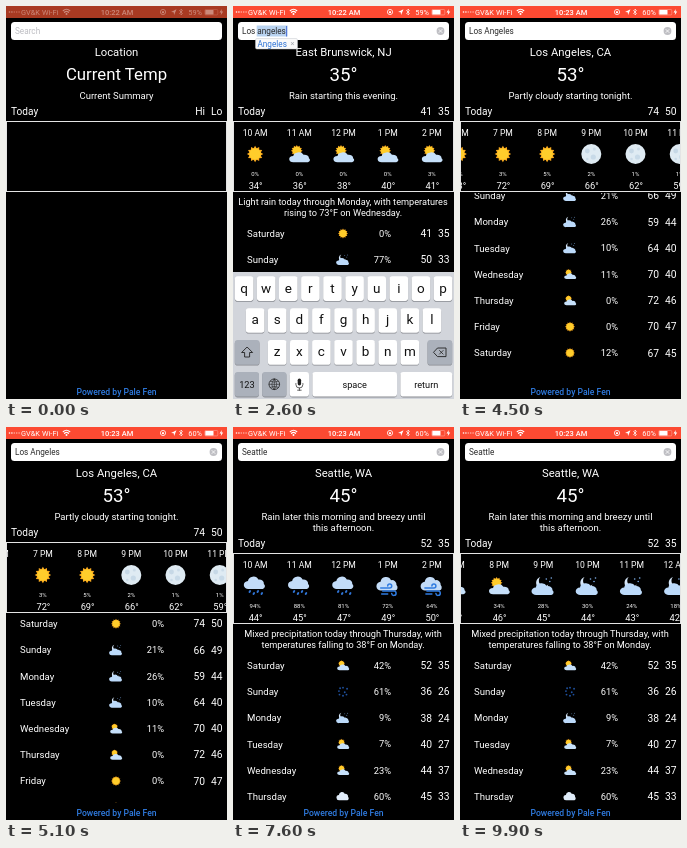
Animation, 221 px wide and 393 px high, one loop 10 s. Source, as an HTML page:

```html
<!DOCTYPE html>
<html lang="en">
<head>
<meta charset="utf-8">
<title>Weather</title>
<style>
  html, body { margin: 0; width: 100%; height: 100%; overflow: hidden; background: #000; }
  #stage { display: block; width: 100vw; height: 100vh; font-family: Roboto, "Liberation Sans", sans-serif; }
</style>
</head>
<body>
<svg id="stage" viewBox="0 0 221 393"></svg>
<script>
const LOOP = 10000, STEP = 100;
const CELL = 44.2, ROW = 26.2;

// ---- drawing helpers ----
const text = (x, y, str, size, anchor = 'middle', fill = '#fff', extra = '') =>
  `<text x="${x}" y="${y + size * 0.355}" font-size="${size}" text-anchor="${anchor}" fill="${fill}" ${extra}>${str}</text>`;
const rect = (x, y, w, h, fill, r = 0, extra = '') =>
  `<rect x="${x}" y="${y}" width="${w}" height="${h}" rx="${r}" fill="${fill}" ${extra}/>`;
const circle = (x, y, r, fill, extra = '') => `<circle cx="${x}" cy="${y}" r="${r}" fill="${fill}" ${extra}/>`;
const path = (d, fill, extra = '') => `<path d="${d}" fill="${fill}" ${extra}/>`;
const line = (d, color, w = 1) => path(d, 'none', `stroke="${color}" stroke-width="${w}" stroke-linecap="round"`);
const at = (x, y, s, body) => `<g transform="translate(${x} ${y}) scale(${s})">${body}</g>`;

// ---- weather icons, about 20 units wide ----
const star = Array.from({ length: 24 }, (_, i) => {
  const r = i % 2 ? 6.2 : 8.6, a = i * Math.PI / 12;
  return `${(r * Math.cos(a)).toFixed(2)},${(r * Math.sin(a)).toFixed(2)}`;
}).join(' ');
const sun = `<polygon points="${star}" fill="#fbab1e"/>` + circle(0, 0, 6, '#ffcd2b');
const cloud = fill => path('M-6 6a4 4 0 0 1-.5-8 5 5 0 0 1 9.5-1.5 4.2 4.2 0 0 1 5 4.5 3 3 0 0 1-1 5z', fill);
const crescent = path('M-2-8a6.2 6.2 0 1 0 8 7.500a5.400 5.400 0 0 1-8-7.500z', '#d5e6f8');
const sparks = [[3, -7], [6.500, -4.500], [8, -8]].map(([x, y]) => circle(x, y, 0.8, '#7fb0ea')).join('');
const drops = (color, y) => [-5, -1, 3, 7].map((x, i) =>
  line(`M${x} ${y + i % 2 * 2}l-.6 1`, color, 1.9)).join('');
const ICONS = {
  sun,
  partly: at(-2.5, -3.2, 0.68, sun) + at(1, 3.5, '1.08 .8', cloud('#c6e0fa')),
  moon: circle(0, 0, 10, '#dfebf3') + circle(-4, -3, 2.4, '#c6d8e6') + circle(3, -5, 1.5, '#cbdce9') +
    circle(2, 3, 2.6, '#c8dae8') + circle(-4, 5, 1.3, '#cbdce9'),
  night: at(-1, -1, 1, crescent) + sparks + at(0, 3.3, '1.15 .95', cloud('#bcdafa')),
  rain: at(0, -3, '1.1 1', cloud('#c3dcf8')) + drops('#2f74d6', 5),
  sleet: [[-5, -6], [0, -7], [-7, -1], [3, 1], [-6, 5], [0, 7], [6, 5], [7, -5]]
    .map(([x, y]) => circle(x, y, 1.6, '#1f519f')).join(''),
  wind: at(0, -2, 1.1, cloud('#c3dcf8')) +
    line('M-7 2H2a2 2 0 1 0-2-2M-5 5H6a2.200 2.200 0 1 1-2 2.500M-6 8H0', '#2f7be0', 1.5),
  cloud: at(0, -0.5, '1.1 1.15', cloud('#e0ecf9')),
  shower: at(0, -2, 1.1, cloud('#eef2f6')) + drops('#8a98a8', 5),
};
const icon = (name, x, y, s) => at(x, y, s, ICONS[name]);

// ---- data: hours are "icon chance temp", days are "icon chance high low" ----
const split = str => str.split(', ').map(s => s.split(' '));
const scenes = [
  { until: 500, temp: 'Current Temp', summary: ['Current Summary'], hi: 'Hi', lo: 'Lo', hours: [], days: [], outlook: [] },
  {
    until: 3000, temp: '35°', summary: ['Rain starting this evening.'], hi: 41, lo: 35,
    outlook: ['Light rain today through Monday, with temperatures', 'rising to 73°F on Wednesday.'],
    hours: split('sun 0 34, partly 0 36, partly 0 38, partly 0 40, partly 3 41'),
    days: split('sun 0 41 35, night 77 50 33, shower 61 50 48, partly 24 62 50, partly 12 73 54, shower 38 66 47'),
  },
  {
    until: 7600, temp: '53°', summary: ['Partly cloudy starting tonight.'], hi: 74, lo: 50,
    outlook: ['No precipitation throughout the week, with', 'temperatures falling to 59°F on Monday.'],
    hours: split('sun 0 53, sun 0 57, sun 0 61, sun 0 65, sun 0 68, sun 0 71, sun 0 73, sun 0 74, sun 1 73, ' +
      'sun 3 72, sun 5 69, moon 2 66, moon 1 62, moon 1 59'),
    days: split('sun 0 74 50, night 21 66 49, night 26 59 44, night 10 64 40, partly 11 70 40, partly 0 72 46, ' +
      'sun 0 70 47, sun 12 67 45'),
    slide: [[3400, 0], [3500, 40], [3700, 215], [3900, 325], [4200, 377], [4500, 377], [4900, 383]],
    scroll: [[4100, 0], [4300, 40], [4500, 64], [4700, 52], [4900, 46], [5000, 46], [5300, 0]],
  },
  {
    until: LOOP, temp: '45°', summary: ['Rain later this morning and breezy until', 'this afternoon.'], hi: 52, lo: 35,
    outlook: ['Mixed precipitation today through Thursday, with', 'temperatures falling to 38°F on Monday.'],
    hours: split('rain 94 44, rain 88 45, rain 81 47, wind 72 49, wind 64 50, wind 55 51, partly 50 51, partly 45 50, ' +
      'partly 40 49, partly 38 47, partly 34 46, night 28 45, night 30 44, night 24 43, night 18 42'),
    days: split('partly 42 52 35, sleet 61 36 26, night 9 38 24, partly 7 40 27, partly 23 44 37, cloud 60 45 33, ' +
      'partly 31 47 36, rain 52 48 38'),
    slide: [[9400, 0], [9500, 60], [9700, 285], [9900, 425]],
    scroll: [[8300, 0], [8500, 30], [8700, 66], [8900, 59], [9100, 55], [9400, 0]],
  },
];
const DAYS = ['Saturday', 'Sunday', 'Monday', 'Tuesday', 'Wednesday', 'Thursday', 'Friday'];

const hourCell = ([name, chance, temp], i) => {
  const h = 10 + i, x = CELL * (i + 0.5);
  return text(x, 11.5, `${(h + 11) % 12 + 1} ${h % 24 < 12 ? 'AM' : 'PM'}`, 8.6) +
    icon(name, x, 33, name === 'sun' ? 0.95 : 1) +
    text(x, 53, chance + '%', 6) + text(x + 0.5, 65, temp + '°', 9.3);
};
const dayRow = ([name, chance, hi, lo], i) => {
  const y = 40.5 + ROW * i;
  return text(14, y, DAYS[i % 7], 9.6, 'start') + icon(name, 110, y, 0.58) +
    text(158, y, chance + '%', 9.3, 'end') + text(199, y, hi, 10.3, 'end') + text(216.5, y, lo, 10.3, 'end');
};
function sceneMarkup(s) {
  const dy = 11 * (s.summary.length - 1);
  return `<g class="scene">` +
    text(110.5, 68, s.temp, s.hours.length ? 18.7 : 16.8) +
    s.summary.map((str, i) => text(110.5, 90 + 11 * i, str, 9.5)).join('') +
    text(5, 105 + dy, 'Today', 10.1, 'start') +
    text(199, 105 + dy, s.hi, 10.3, 'end') + text(216.5, 105 + dy, s.lo, 10.3, 'end') +
    `<svg y="${115 + dy}" width="221" height="71"><g class="hours">${s.hours.map(hourCell).join('')}</g></svg>` +
    rect(0.5, 115.5 + dy, 220, 70, 'none', 0, 'stroke="#e4e4e4"') +
    `<svg y="${187 + dy}" width="221" height="${189 - dy}"><g class="days">` +
    s.outlook.map((str, i) => text(110, 8.5 + 11.4 * i, str, 9.2)).join('') +
    s.days.map(dayRow).join('') + `</g></svg></g>`;
}

// ---- fixed parts ----
const statusBar = rect(0, 0, 221, 12, '#fc4a32', 0, 'id="bar"') + `<g id="status">` +
  [0, 1, 2, 3, 4].map(i => circle(3.5 + i * 2.4, 6, 0.8, i < 2 ? '#fff' : '#ffb3a6')).join('') +
  text(15, 6, 'GV&amp;K', 7.4, 'start') + text(36, 6, 'Wi-Fi', 7.4, 'start') +
  line('M57.200 4.700a4.700 4.700 0 0 1 6.600 0M58.500 6.300a2.900 2.900 0 0 1 4 0', '#fff', 1.2) + circle(60.5, 8, 1, '#fff') +
  text(111, 6, '', 7.5, 'middle', '#fff', 'id="clock" font-weight="500"') +
  circle(157, 6, 2.6, 'none', 'stroke="#fff" stroke-width=".8"') + rect(156, 5.3, 2, 1.8, '#fff') +
  path('M170.500 3.300l-5.500 2.600 2.700.400.400 2.700z', '#fff') +
  line('M173.500 4.500l3 3-1.500 1.500v-6l1.500 1.500-3 3', '#fff', 0.7) +
  text(196, 6, '', 7.4, 'end', '#fff', 'id="charge"') +
  rect(198.8, 3.5, 13, 5.4, 'none', 1, 'stroke="#ffb3a6" stroke-width=".5"') + rect(199.3, 4, 8.2, 4.4, '#fff', 0.5) +
  path('M215.800 3l-2.300 3.500h1.700l-.500 2.700 2.500-3.600h-1.700z', '#fff') + `</g>`;

const searchBar = rect(5, 16, 211, 18, '#fff', 3.5) +
  rect(23.7, 19.5, 31, 11, '#b9d3f0', 0, 'id="mark"') +
  text(9, 25.2, 'Search', 8.2, 'start', '#bdbdc2', 'id="hint"') +
  text(9, 25.2, '', 8.2, 'start', '#2a2a2a', 'id="query"') +
  rect(0, 20, 0.9, 10.5, '#4a6fd8', 0, 'id="caret"') +
  `<g id="clear">${circle(207.5, 25, 3.9, '#bfbfc4')}${line('M206 23.500l3 3m0-3l-3 3', '#fff', 0.8)}</g>`;

const hintBox = `<g id="fix">` + rect(22.5, 32.5, 42, 10.5, '#fafafa', 1.5, 'stroke="#c4c8cf" stroke-width=".5"') +
  text(24.5, 37.7, 'Angeles', 8.2, 'start', '#2f74d6') + text(59.5, 37.7, '×', 7.5, 'middle', '#a5a9b0') + `</g>`;

const GREY = '#abb1bb';
const key = (x, w, row, label, size = 13.5, fill = '#fff', extra = '') => {
  const y = 270.3 + 31.9 * row;
  return rect(x, y + 0.8, w, 24.6, '#878a90', 2.8) + rect(x, y, w, 24.6, fill, 2.8, extra) +
    (label ? text(x + w / 2, y + 12.3 - (size > 12 ? 0.8 : 0), label, size, 'middle', '#111', extra && 'id="returnText"') : '');
};
const letters = (str, x, row) => [...str].map((c, i) => key(x + 22.1 * i, 18.6, row, c)).join('');
const outline = d => path(d, 'none', 'stroke="#222" stroke-width=".9" stroke-linejoin="round"');
const keyboard = `<g id="keyboard">` + rect(0, 266, 221, 127, '#d2d5db') +
  letters('qwertyuiop', 1.8, 0) + letters('asdfghjkl', 12.8, 1) + letters('zxcvbnm', 34.9, 2) +
  key(1.8, 24.7, 2, '', 0, GREY) + outline('M14.100 341l5.500 5.500h-3v4.500h-5v-4.500h-3z') +
  key(194.5, 24.7, 2, '', 0, GREY) + outline('M200.500 346.300l4-4.300h8.500v8.600h-8.500z') +
  line('M206.500 344.500l3.600 3.600m0-3.600l-3.600 3.600', '#222', 0.8) +
  key(1.8, 24.2, 3, '123', 9.2, GREY) + key(29.2, 24.2, 3, '', 0, GREY) +
  circle(41.3, 378.3, 5.3, 'none', 'stroke="#222" stroke-width=".8"') +
  line('M36 378.300h10.600M41.300 373v10.600M37.300 375.300q4 1.800 8 0M37.300 381.300q4-1.800 8 0M41.300 373q-5 5.300 0 10.600q5-5.300 0-10.600', '#222', 0.6) +
  key(56.7, 19.3, 3, '') + rect(64.7, 372.5, 3.4, 7, '#222', 1.7) +
  line('M62.900 377.500v1a3.500 3.500 0 0 0 7 0v-1M66.400 382v2.200m-1.800 0h3.600', '#222', 0.7) +
  key(79.4, 84.6, 3, 'space', 9.2) + key(167.4, 51.8, 3, 'return', 9.2, GREY, 'id="returnKey"') + `</g>`;

const $ = id => document.getElementById(id);
const stage = $('stage');
stage.innerHTML = rect(0, 0, 221, 393, '#000') + scenes.map(sceneMarkup).join('') +
  text(110.5, 45.5, '', 11.3, 'middle', '#fff', 'id="city"') +
  text(110.5, 385.6, 'Powered by Pale Fen', 8.6, 'middle', '#2f7be0', 'font-weight="500"') +
  statusBar + searchBar + hintBox + keyboard;
const views = [...stage.querySelectorAll('.scene')].map(el => ({
  el, hours: el.querySelector('.hours'), days: el.querySelector('.days'),
}));

// ---- timeline ----
function track(points, t) {
  if (!points || t <= points[0][0]) return points ? points[0][1] : 0;
  for (let i = 1; i < points.length; i++) {
    const [a, va] = points[i - 1], [b, vb] = points[i];
    if (t <= b) return va + (vb - va) * (t - a) / (b - a);
  }
  return points[points.length - 1][1];
}
const HIDDEN = 130;
const keyboardDrop = [
  [1100, HIDDEN], [1200, 31], [1300, 8], [1400, 0], [2600, 0], [2700, 40], [2800, 100], [2900, HIDDEN],
  [5300, HIDDEN], [5400, 31], [5500, 8], [5600, 0], [6800, 0], [6900, 40], [7000, 100], [7100, HIDDEN],
];
const typed = (str, from, t) => str.slice(0, Math.max(0, (t - from) / STEP + 1));
const queryAt = t =>
  t < 2700 ? typed('Los angeles', 1500, t) : t < 5400 ? 'Los Angeles' : typed('Seattle', 6200, t);
const cityAt = t =>
  t < 300 ? 'Location' : t < 2800 ? 'East Brunswick, NJ' : t < 7200 ? 'Los Angeles, CA' : 'Seattle, WA';
const show = (el, on) => { el.style.display = on ? '' : 'none'; };

function render(t) {
  const current = scenes.findIndex(s => t < s.until);
  views.forEach((v, i) => show(v.el, i === current));
  const { slide, scroll } = scenes[current];
  views[current].hours.setAttribute('transform', `translate(${-track(slide, t)} 0)`);
  views[current].days.setAttribute('transform', `translate(0 ${-track(scroll, t)})`);
  $('city').textContent = cityAt(t);

  const lit = Math.min(1, t / 300);
  $('bar').setAttribute('fill', `rgb(${168 + 84 * lit},${58 + 16 * lit},${34 + 16 * lit})`);
  $('status').setAttribute('opacity', 0.4 + 0.6 * lit);
  $('clock').textContent = t < 3000 ? '10:22 AM' : '10:23 AM';
  $('charge').textContent = t < 3000 ? '59%' : '60%';

  const drop = track(keyboardDrop, t), query = queryAt(t), fixing = t === 2600;
  $('keyboard').setAttribute('transform', `translate(0 ${drop})`);
  show($('keyboard'), drop < HIDDEN);
  $('query').textContent = query;
  show($('hint'), !query);
  show($('clear'), query);
  show($('mark'), fixing);
  show($('fix'), fixing);
  show($('caret'), drop < 35 && (query || t % 900 < 450));
  $('caret').setAttribute('x', query ? 9.3 + $('query').getComputedTextLength() : 8);
  $('returnKey').setAttribute('fill', fixing ? '#fff' : GREY);
  $('returnText').setAttribute('fill', query ? '#111' : '#5f646c');
}

const start = performance.now();
let last = -1;
function tick() {
  const t = Math.floor((performance.now() - start) % LOOP / STEP) * STEP;
  if (t !== last) render(last = t);
  requestAnimationFrame(tick);
}
tick();
</script>
</body>
</html>
```
